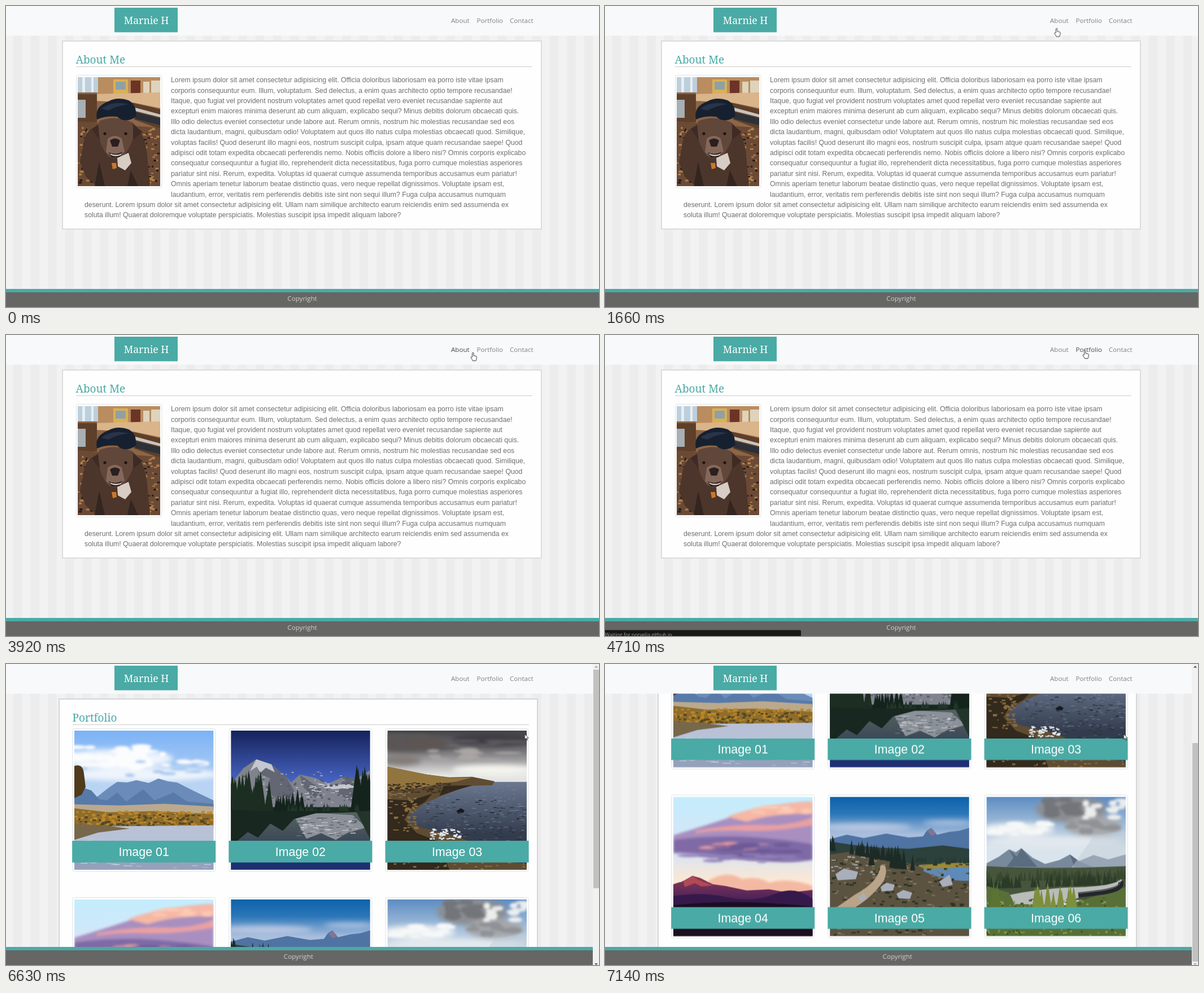
An HTML page that plays this animation: 1050 px wide and 533 px high, repeating every 8000 ms.

```html
<!DOCTYPE html>
<html lang="en">
<head>
<meta charset="utf-8">
<title>Portfolio site</title>
<style>
html, body { margin: 0; width: 100%; height: 100%; overflow: hidden; background: #f1f1f1; }
svg.stage { display: block; width: 1050px; height: 533px; }
.serif { font-family: "Noto Serif", serif; }
.ui { font: 11.6px "Open Sans", "Noto Sans", sans-serif; }
.copy { font: 12.25px "Liberation Sans", Arial, sans-serif; fill: #6f6f6f; }
.label { font: 21.4px "Liberation Sans", Arial, sans-serif; fill: #fff; text-anchor: middle; }
.teal { fill: #4aaaa5; }
.link { fill: #808182; }
.thumb { fill: #fff; stroke: #dee2e6; }

.cut { animation: 8s step-end infinite; }
#about { animation-name: about; }
#portfolio, #bar { animation-name: portfolio; }
#page { animation-name: page; }
#thumb { animation-name: thumb; }
#copyright { animation-name: copyright; }
#linkA { animation-name: linkA; }
#linkP { animation-name: linkP; }
#status { animation-name: status; }
#cache { animation-name: cache; }
#host { animation-name: host; }
#arrow { animation-name: arrow; }
#hand { animation-name: hand; }
#up { animation-name: up; }
#down { animation-name: down; }
#cursor { animation: move 8s linear infinite; }

@keyframes about { 0% { opacity: 1 } 68.95%, 100% { opacity: 0 } }
@keyframes portfolio { 0% { opacity: 0 } 68.95%, 100% { opacity: 1 } }
@keyframes copyright { 0% { transform: none } 68.95%, 100% { transform: translateX(-6.7px) } }
@keyframes page {
  0% { transform: none } 88.1% { transform: translateY(-91px) }
  89.2%, 100% { transform: translateY(-181.5px) }
}
@keyframes thumb {
  0% { transform: none } 88.1% { transform: translateY(65px) }
  89.2%, 100% { transform: translateY(129.5px) }
}
@keyframes up { 0% { fill: #a3a3a3 } 88.1%, 100% { fill: #505050 } }
@keyframes down { 0% { fill: #505050 } 89.2%, 100% { fill: #a3a3a3 } }
@keyframes linkA {
  0% { fill: #808182 } 22.4% { fill: #505152 } 37.7% { fill: #4b4b4b } 50.5%, 100% { fill: #808182 }
}
@keyframes linkP {
  0% { fill: #808182 } 51% { fill: #4b4b4b } 68.95% { fill: #808182 }
  75.5% { fill: #4b4b4b } 78.5%, 100% { fill: #808182 }
}
@keyframes status {
  0% { opacity: 0 } 23.75% { opacity: 1 }
  42.5% { opacity: .75 } 43.1% { opacity: .5 } 43.75% { opacity: .25 } 44.4% { opacity: 0 }
  53% { opacity: 1 }
  71.5% { opacity: .75 } 72.1% { opacity: .5 } 72.75% { opacity: .25 } 73.35%, 100% { opacity: 0 }
}
@keyframes cache { 0% { opacity: 0 } 32.85% { opacity: 1 } 50%, 100% { opacity: 0 } }
@keyframes host { 0% { opacity: 1 } 32.85% { opacity: 0 } 50%, 100% { opacity: 1 } }
@keyframes arrow { 0% { opacity: 0 } 2.35% { opacity: 1 } 19.5% { opacity: 0 } 77.5%, 100% { opacity: 1 } }
@keyframes hand { 0% { opacity: 0 } 19.5% { opacity: 1 } 77.5%, 100% { opacity: 0 } }
@keyframes move {
  0%, 2.35% { transform: translate(971px, 517px) }
  5.25%, 8.125% { transform: translate(915px, 349px) }
  10.625%, 12.875% { transform: translate(852px, 195px) }
  17.5% { transform: translate(813px, 70px) }
  20% { transform: translate(800px, 42px) }
  20.75%, 23.125% { transform: translate(799.7px, 39.5px) }
  24.75% { transform: translate(799.7px, 26px) }
  26.375%, 32.75% { transform: translate(799.7px, 37px) }
  32.85%, 41.875% { transform: translate(799.7px, 35px) }
  49% { transform: translate(826.8px, 31px) }
  52.5% { transform: translate(850px, 24px) }
  54.125% { transform: translate(850px, 18px) }
  55.875%, 58.125% { transform: translate(850px, 24px) }
  58.875%, 74.625% { transform: translate(850px, 27px) }
  82.85%, 100% { transform: translate(918.4px, 124px) }
}
</style>
</head>
<body>
<svg class="stage" viewBox="0 0 1050 533">
<defs>
  <pattern id="stripes" width="30.64" height="533" patternUnits="userSpaceOnUse">
    <path fill="#f2f2f2" d="M0 0h31v533H0z"/><path fill="#ececec" d="M13 0h15.3v533H13z"/>
  </pattern>
  <filter id="soft" x="-30%" y="-60%" width="160%" height="220%"><feGaussianBlur stdDeviation="5"/></filter>
  <filter id="mist" x="-20%" y="-40%" width="140%" height="180%"><feGaussianBlur stdDeviation="2"/></filter>
  <linearGradient id="sky1" x2="0" y2="1"><stop stop-color="#7cb2f6"/><stop offset=".4" stop-color="#b9d4f3"/></linearGradient>
  <linearGradient id="sky2" x2="0" y2="1"><stop stop-color="#15225a"/><stop offset=".36" stop-color="#4663c0"/></linearGradient>
  <linearGradient id="lake2" x2="0" y2="1"><stop stop-color="#56645f"/><stop offset=".5" stop-color="#3d4a58"/><stop offset=".85" stop-color="#1f2f72"/></linearGradient>
  <linearGradient id="sky3" x2="0" y2="1"><stop stop-color="#454346"/><stop offset=".15" stop-color="#77767a"/><stop offset=".32" stop-color="#e4e4e2"/></linearGradient>
  <linearGradient id="sea3" x2="0" y2="1"><stop stop-color="#6b7890"/><stop offset=".6" stop-color="#333c4d"/></linearGradient>
  <linearGradient id="sky4" x2="0" y2="1"><stop stop-color="#c4edfd"/><stop offset=".4" stop-color="#d8e4f4"/><stop offset=".6" stop-color="#fbe8d4"/></linearGradient>
  <linearGradient id="hill4" x2="0" y2="1"><stop stop-color="#8a3a58"/><stop offset=".4" stop-color="#4a2259"/><stop offset="1" stop-color="#1c0c20"/></linearGradient>
  <linearGradient id="sky5" x2="0" y2="1"><stop stop-color="#0c62a8"/><stop offset=".12" stop-color="#2b76b8"/><stop offset=".27" stop-color="#a9bedd"/></linearGradient>
  <linearGradient id="sky6" x2="0" y2="1"><stop stop-color="#5d8cc2"/><stop offset=".36" stop-color="#d9e4ec"/></linearGradient>

  <symbol id="dog" viewBox="0 0 146 193">
    <path fill="#8c6646" d="M0 0h146v193H0z"/>
    <path fill="#b98d5f" d="M34 0h112v32H34z"/>
    <path fill="#bccfdd" d="M0 0h36v27H0z"/><path fill="#e9eef0" d="M8 0h5v27H8zM24 0h4v27h-4z"/>
    <path fill="#d9b056" d="M63 4h26v27H63z"/><path fill="#8fa1a4" d="M67 8h18v14H67z"/>
    <path fill="#6b3426" d="M94 6h17v26H94z"/><path fill="#dfd3bc" d="M116 8h11v24h-11zM130 6h16v22h-16z"/>
    <path fill="#dab48a" d="M30 30 146 27v28L98 45 30 42z"/>
    <path fill="#5e3f2a" d="M95 45 146 57v35L100 75zM0 30h34v50H0z"/>
    <path fill="#a7b0b4" d="M0 40h14v32H0z"/>
    <path fill="#c9c4bd" d="M102 54 146 66v5L102 60z"/><path fill="#2c3038" d="M102 62 146 73v12L102 74z"/>
    <path fill="#6b4a35" d="M0 78 146 90v103H0z"/><g id="rug"></g>
    <path fill="#4c352b" d="M36 88Q16 88 10 118L4 150 14 176 34 193H128L124 150Q122 100 96 80z"/>
    <path fill="#61463a" d="M38 78Q66 66 96 80L102 96Q97 118 84 136 66 149 53 139 39 121 36 98z"/>
    <path fill="#3f2b25" d="M36 84 25 92 39 112zM98 84l17 13-17 14z"/>
    <path fill="#85685a" d="M53 109Q66 99 78 109L83 132Q66 146 50 133z"/>
    <path fill="#2b1f1f" d="M57 112q9-7 18 0l-4 11H61zM55 133q12 6 24-1l-5 10H60z"/>
    <path fill="#d8cdc4" d="M57 135q11 5 21 0l-2 3q-9 4-17 0zM70 143l20-9 5 18-11 13-13-7z"/>
    <circle cx="48" cy="100" r="2.6" fill="#1c1515"/><circle cx="85" cy="100" r="2.6" fill="#1c1515"/>
    <path fill="#c7792b" d="M60 152h8l1 9-7 2z"/>
    <path fill="#33251f" d="M38 150 48 193H30zM94 165l13 28H88z"/>
    <path fill="#17202f" d="M34 75Q29 52 54 43 70 34 90 41 105 49 103 70 84 83 70 70 50 68 34 75z"/>
    <path fill="#283449" d="M42 56Q60 41 90 48 72 50 54 59z"/>
  </symbol>

  <symbol id="p1" viewBox="0 0 247 247">
    <path fill="url(#sky1)" d="M0 0h247v247H0z"/>
    <g fill="#eef4fc" filter="url(#soft)"><ellipse cx="70" cy="50" rx="105" ry="17"/><ellipse cx="120" cy="78" rx="140" ry="12"/></g>
    <g id="clouds1" filter="url(#mist)"></g>
    <path fill="#6b8cb9" d="M0 126 40 118 60 102 76 91 94 92 110 88 132 93 149 85 166 90 182 92 214 108 247 124v16H0z"/>
    <path fill="#587aa9" d="M0 112 14 101 30 106 44 122 58 124 76 110 92 126 122 104 142 124 176 110 200 126 247 130v10H0z"/>
    <path fill="#bba98d" d="M0 131 80 133 160 130 247 135v12H0z"/>
    <path fill="#8e6d2d" d="M0 138 60 145 140 143 247 148v25H0z"/><g id="grove"></g>
    <path fill="#b8c1d6" d="M0 178 60 170 247 168v79H0z"/>
    <path fill="#77684c" d="M0 166 50 168 98 174 42 181 0 194z"/>
    <path fill="#95a1bb" d="M0 222Q120 205 247 226v21H0z"/><g id="ripple"></g>
    <path fill="#4f3a1c" d="M0 63Q15 58 17 76L20 100 13 114 0 120z"/>
  </symbol>

  <symbol id="p2" viewBox="0 0 247 247">
    <path fill="url(#sky2)" d="M0 0h247v247H0z"/>
    <path fill="#80838d" d="M0 95 22 67 45 51 72 60 98 82 107 92 122 78 150 84 170 95 200 82 222 86 247 70v76H0z"/>
    <path fill="#626773" d="M45 51 50 76 70 85 62 108 104 135 112 106 98 82 72 60zM122 78 128 100 150 120 160 104zM200 82 190 112 220 130 247 120V88z"/>
    <path fill="#c4c7ce" d="M45 51 34 72 46 64 52 75 62 66 78 74 72 60zM150 92 170 97 210 95 222 101 180 104z"/>
    <g id="snow"></g>
    <path fill="url(#lake2)" d="M0 142h247v105H0z"/>
    <path fill="#8c9199" d="M112 152 150 146 216 150 240 172 206 182 186 194 160 182 134 192z"/>
    <path fill="#18271f" d="M0 136H247v8L150 147 112 157 92 178 70 165 48 190 30 180 0 205z"/>
    <path fill="#23352a" d="M222 143h25v50l-12-24z"/><g id="pines"></g><g id="glints"></g>
  </symbol>

  <symbol id="p3" viewBox="0 0 247 247">
    <path fill="url(#sky3)" d="M0 0h247v247H0z"/>
    <g filter="url(#soft)"><ellipse cx="40" cy="24" rx="70" ry="14" fill="#5b5552"/><ellipse cx="190" cy="16" rx="75" ry="12" fill="#3f3e44"/><ellipse cx="25" cy="53" rx="35" ry="9" fill="#817b77"/><ellipse cx="190" cy="70" rx="75" ry="9" fill="#f5f5f0"/></g>
    <g id="clouds3" filter="url(#mist)"></g>
    <path fill="url(#sea3)" d="M0 91h247v156H0z"/><g id="waves"></g>
    <path fill="#5f4c32" d="M0 64 35 71 70 78 110 83 150 82 190 90 186 97 150 98 124 105 94 117 69 128 44 144 36 157 59 172 84 178 124 187 144 197 170 226 247 237v10H0z"/>
    <path fill="#92743f" d="M0 64 35 71 70 78 112 84 150 83 120 91 98 93 60 101 0 108z"/>
    <path fill="#33291c" d="M0 122 42 124 80 112 66 127 40 142 30 158 52 182 90 196 110 247H0zM100 98 150 97 124 105 92 116z"/>
    <g id="foam"></g><path fill="#161a20" d="M122 143l8-5 7 4-3 4h-9z"/><g id="heath"></g>
  </symbol>

  <symbol id="p4" viewBox="0 0 247 247">
    <path fill="url(#sky4)" d="M0 0h247v247H0z"/>
    <g filter="url(#mist)">
      <path fill="#a98fc0" d="M0 68Q60 50 120 30T247 8v104Q190 118 130 112T0 100z"/>
      <path fill="#f6b8a4" d="M95 35Q150 14 247 8v22Q180 28 130 44z"/>
      <path fill="#7f6aa6" d="M0 76Q80 66 150 72T247 84v28Q205 118 160 114T70 104 0 98z"/>
      <path fill="#e9a0a2" d="M40 60Q110 48 160 50T247 36v14Q180 62 130 60T40 64z"/>
    </g>
    <g id="clouds4" filter="url(#mist)"></g>
    <path fill="#f4b9a2" filter="url(#mist)" d="M60 150Q95 128 122 146 150 140 170 152 205 142 247 158v14H60z"/>
    <path fill="url(#hill4)" d="M0 155 18 149 34 140 48 144 70 155 92 158 130 166 170 164 205 170 247 165v82H0z"/>
    <path fill="#b14a55" d="M18 150 34 141 44 147 70 157 50 159 38 153 20 160z"/>
    <path fill="#35194b" d="M0 176Q50 168 96 178T180 172 247 182v65H0z"/><path fill="#1c0d21" d="M0 192Q120 180 247 195v52H0z"/>
  </symbol>

  <symbol id="p5" viewBox="0 0 247 247">
    <path fill="url(#sky5)" d="M0 0h247v247H0z"/>
    <g filter="url(#soft)" fill="#b9c7e2"><ellipse cx="60" cy="54" rx="85" ry="7"/><ellipse cx="210" cy="46" rx="45" ry="4"/></g>
    <path fill="#4f73a2" d="M0 75 30 67 60 73 100 65 140 72 165 70 172 60 180 55 190 67 212 62 230 60 247 55v65H0z"/>
    <path fill="#86748f" d="M173 61 180 56 188 66 180 69z"/>
    <path fill="#2c403c" d="M0 79 40 85 90 90 140 92 200 86 247 92v55H0z"/>
    <path fill="#5b5340" d="M0 102 60 94 110 110 170 126 247 138v109H0z"/>
    <path fill="#5d8ab9" d="M166 125Q210 117 247 125v24Q205 150 166 132z"/><path fill="#9b8935" d="M152 121 247 116v8L170 128z"/>
    <g id="scrub"></g>
    <path fill="#b9a389" d="M90 121Q88 150 45 173L6 200H38Q74 180 96 148 103 130 97 121z"/>
    <g fill="#a9aebb"><path d="M10 137 25 127 50 133 46 146 14 148zM90 160 100 152 115 156 112 166 92 168zM118 172 130 165 146 170 142 181 122 180zM194 150 212 138 218 156 200 160zM50 178 60 171 66 180 56 186z"/></g>
    <g id="firs"></g>
  </symbol>

  <symbol id="p6" viewBox="0 0 247 247">
    <path fill="url(#sky6)" d="M0 0h247v247H0z"/>
    <g filter="url(#soft)"><ellipse cx="150" cy="22" rx="62" ry="24" fill="#8b8d92"/><ellipse cx="190" cy="52" rx="50" ry="18" fill="#a6a8ab"/><ellipse cx="55" cy="58" rx="65" ry="12" fill="#eef1f3"/><ellipse cx="120" cy="80" rx="120" ry="10" fill="#e3e9ee"/></g>
    <g id="clouds6" filter="url(#mist)"></g>
    <path fill="#78899b" d="M0 118 22 106 40 93 52 98 62 91 82 108 104 119 130 112 148 102 164 114 190 103 216 111 247 102v35H0z"/>
    <path fill="#5a6c80" d="M40 93 48 108 36 124H90L62 91 54 106zM148 102 156 125h34l-26-11z"/>
    <path fill="#becbd4" opacity=".45" d="M190 70 247 60v65L150 127z"/>
    <path fill="#46553b" d="M0 123Q100 129 247 123v60H0z"/><g id="woods"></g>
    <path fill="#b9bcb9" d="M30 176Q100 161 170 160 224 158 239 146L244 154Q215 164 180 170 150 188 112 196H44z"/>
    <path fill="#587038" d="M0 158 40 170 50 190 140 192 247 160v87H0z"/>
    <path fill="none" stroke="#23262b" stroke-width="9" d="M163 174 206 169Q244 163 238 150"/>
    <path fill="none" stroke="#8d8d85" d="M163 171 206 166Q240 160 237 149"/><g id="meadow"></g><g id="spruce"></g>
  </symbol>
</defs>

<path fill="url(#stripes)" d="M0 0h1050v533H0z"/>

<g id="about" class="cut">
  <path fill="#fefefe" stroke="#dcdcdc" stroke-width="2" d="M100 62h848v333H100z"/>
  <text class="serif teal" x="123.5" y="102" font-size="19">About Me</text>
  <path fill="#ccc" d="M124 107h808v1H124z"/>
  <rect class="thumb" x="124.5" y="122.5" width="151.5" height="199.5" rx="3"/>
  <use href="#dog" x="127" y="126" width="146" height="193"/>
  <g id="copy" class="copy"></g>
</g>

<g id="portfolio" class="cut">
  <g id="page" class="cut">
    <path fill="#fefefe" stroke="#d6d6d6" stroke-width="2" d="M94 62h847v700H94z"/>
    <text class="serif teal" x="117.5" y="102" font-size="19">Portfolio</text>
    <path fill="#ccc" d="M118 107h808v1H118z"/>
    <g id="gallery"></g>
  </g>
</g>

<path fill="#f8f9fa" d="M0 0h1050v52.5H0z"/>
<path class="teal" d="M192 3h112v43.5H192z"/>
<text class="serif" x="248.5" y="32" font-size="17.6" fill="#fff" text-anchor="middle">Marnie H</text>
<g class="ui">
  <text id="linkA" class="link cut" x="788" y="30">About</text>
  <text id="linkP" class="link cut" x="833.5" y="30">Portfolio</text>
  <text class="link" x="892" y="30">Contact</text>
</g>

<path fill="#666664" d="M0 507h1050v26H0z"/><path class="teal" d="M0 501h1050v6H0z"/>
<text id="copyright" class="ui cut" x="524.5" y="521.5" fill="#d2d2d2" text-anchor="middle">Copyright</text>

<g id="bar" class="cut">
  <path fill="#f1f1f1" d="M1039 0h11v533h-11z"/>
  <path id="thumb" class="cut" fill="#c1c1c1" d="M1040 10h10v387h-10z"/>
  <path id="up" class="cut" d="M1042 6.500h6l-3-3.500z"/><path id="down" class="cut" d="M1042 530h6l-3 3z"/>
</g>

<g id="status" class="cut" font-family="Open Sans, Noto Sans, sans-serif" font-size="8.8" fill="#a2a5a2">
  <path fill="#161815" d="M0 522.5h345q2 0 2 2V533H0z"/>
  <text id="host" class="cut" y="534">Waiting for norvelia.github.io...</text>
  <text id="cache" class="cut" y="534">Waiting for cache...</text>
</g>

<g id="cursor" fill="#fff" stroke="#222" stroke-width=".9" stroke-linejoin="round">
  <path id="arrow" class="cut" d="M0 0V9.500L2.200 7.500 3.700 11 5.200 10.300 3.800 7H6.700z"/>
  <path id="hand" class="cut" d="M-1.300 8V1.300a1.200 1.200 0 0 1 2.400 0V5.500l4 .9q1.600.5 1.500 2L6 11.500 5 14.700H-.5Q-1.500 12-3.600 9.600q-.7-1.900.8-1.800z"/>
</g>
</svg>
<script>
const $ = id => document.getElementById(id);
let seed = 7;
const rnd = () => (seed = seed * 16807 % 2147483647) / 2147483647;
const between = (a, b) => a + (b - a) * rnd();
const fix = n => n.toFixed(1);

const draw = (id, fill, n, shape) => {
  const d = Array.from({ length: n }, shape).join('');
  $(id).insertAdjacentHTML('beforeend', `<path fill="${fill}" d="${d}"/>`);
};
// Small flat flecks inside a box
const flecks = (id, fill, n, x0, y0, x1, y1, w, h) => draw(id, fill, n, () => {
  const fw = fix(between(.4, 1) * w);
  return `M${fix(between(x0, x1))} ${fix(between(y0, y1))}h${fw}v${fix(between(.4, 1) * h)}h-${fw}z`;
});
// Flat ovals that join into clouds
const puffs = (id, fill, n, x0, y0, x1, y1, w, h) => draw(id, fill, n, () => {
  const rx = fix(between(.4, 1) * w), ry = fix(between(.4, 1) * h), arc = `a${rx} ${ry} 0 1 1 `;
  return `M${fix(between(x0, x1))} ${fix(between(y0, y1))}${arc}${2 * rx} 0${arc}${-2 * rx} 0z`;
});
// Narrow conifers; the base line runs from (x0, y0) to (x1, y1)
const trees = (id, fill, n, x0, y0, x1, y1, tall) => draw(id, fill, n, () => {
  const t = rnd(), x = x0 + (x1 - x0) * t, y = y0 + (y1 - y0) * t;
  const h = between(.6, 1) * tall, w = h * .12 + 1;
  return `M${fix(x - w)} ${fix(y)}L${fix(x)} ${fix(y - h)} ${fix(x + w)} ${fix(y)}z`;
});

flecks('rug', '#b5824c', 110, 0, 88, 143, 190, 6, 4);
flecks('rug', '#241d1c', 110, 0, 88, 143, 190, 6, 4);
puffs('clouds1', '#fbfcfe', 26, -15, 28, 120, 66, 22, 7);
puffs('clouds1', '#fbfcfe', 12, 100, 38, 225, 62, 16, 5);
puffs('clouds1', '#a9c8ef', 12, 0, 55, 220, 80, 16, 3);
flecks('grove', '#bd8726', 120, 0, 142, 244, 166, 7, 5);
flecks('grove', '#554720', 90, 0, 148, 244, 168, 7, 4);
flecks('ripple', '#c5cddd', 60, 0, 190, 240, 244, 16, 1.2);
flecks('snow', '#dfe2e7', 32, 115, 94, 225, 118, 8, 1.5);
flecks('snow', '#565b66', 60, 20, 78, 225, 130, 6, 4);
flecks('snow', '#a5a8b0', 60, 20, 70, 225, 130, 5, 3);
trees('pines', '#14231c', 30, 0, 142, 130, 143, 40);
trees('pines', '#1c2e22', 20, 0, 141, 70, 143, 72);
trees('pines', '#14231c', 12, 222, 143, 246, 140, 90);
trees('pines', '#223529', 30, 100, 143, 230, 143, 15);
flecks('glints', '#c7c9cc', 45, 120, 154, 222, 184, 12, 1.5);
flecks('glints', '#59636a', 40, 115, 154, 222, 188, 10, 2);
puffs('clouds3', '#a9a5a2', 12, 20, 34, 200, 52, 26, 4);
puffs('clouds3', '#5a575a', 10, -10, 8, 210, 34, 28, 4);
flecks('waves', '#77839a', 170, 60, 96, 244, 215, 8, 1);
flecks('waves', '#252c3a', 130, 60, 120, 244, 220, 8, 1.5);
flecks('foam', '#e6eaee', 60, 74, 174, 128, 192, 6, 3);
flecks('heath', '#8a7145', 70, 0, 202, 244, 245, 6, 3);
flecks('heath', '#8a6f42', 70, 0, 100, 50, 180, 7, 3);
flecks('heath', '#3a2f1f', 90, 0, 92, 110, 110, 7, 2.5);
puffs('clouds4', '#e99d9f', 9, 40, 78, 150, 92, 24, 2.5);
puffs('clouds4', '#6d5a98', 14, 60, 84, 220, 108, 26, 4);
puffs('clouds4', '#8f7fb6', 14, -10, 102, 210, 116, 22, 4);
puffs('clouds4', '#fbcbb6', 10, 130, 16, 230, 28, 18, 3);
flecks('scrub', '#2e3324', 140, 0, 108, 244, 244, 9, 4);
flecks('scrub', '#85775a', 110, 0, 112, 244, 244, 8, 3);
flecks('scrub', '#a0a2a8', 30, 0, 105, 90, 140, 8, 3);
trees('firs', '#1d2b27', 26, 0, 95, 150, 122, 30);
trees('firs', '#1d2b27', 7, 60, 120, 160, 132, 45);
trees('firs', '#263b35', 22, 160, 116, 246, 118, 14);
puffs('clouds6', '#f7f8f8', 14, -10, 44, 90, 66, 20, 5);
puffs('clouds6', '#727579', 12, 90, 4, 170, 32, 18, 8);
puffs('clouds6', '#eceded', 14, 165, 2, 235, 44, 14, 6);
puffs('clouds6', '#8f9296', 10, 130, 44, 220, 62, 16, 6);
trees('woods', '#38482f', 75, 0, 150, 246, 146, 22);
trees('woods', '#2b3b28', 70, 0, 163, 230, 156, 24);
flecks('meadow', '#8a963f', 110, 0, 180, 244, 244, 5, 4);
flecks('meadow', '#3d5228', 90, 0, 178, 244, 244, 6, 4);
trees('spruce', '#7d8f3c', 14, 80, 195, 160, 198, 48);
trees('spruce', '#5b7333', 6, 8, 198, 36, 198, 48);

const lines = `Lorem ipsum dolor sit amet consectetur adipisicing elit. Officia doloribus laboriosam ea porro iste vitae ipsam
corporis consequuntur eum. Illum, voluptatum. Sed delectus, a enim quas architecto optio tempore recusandae!
Itaque, quo fugiat vel provident nostrum voluptates amet quod repellat vero eveniet recusandae sapiente aut
excepturi enim maiores minima deserunt ab cum aliquam, explicabo sequi? Minus debitis dolorum obcaecati quis.
Illo odio delectus eveniet consectetur unde labore aut. Rerum omnis, nostrum hic molestias recusandae sed eos
dicta laudantium, magni, quibusdam odio! Voluptatem aut quos illo natus culpa molestias obcaecati quod. Similique,
voluptas facilis! Quod deserunt illo magni eos, nostrum suscipit culpa, ipsam atque quam recusandae saepe! Quod
adipisci odit totam expedita obcaecati perferendis nemo. Nobis officiis dolore a libero nisi? Omnis corporis explicabo
consequatur consequuntur a fugiat illo, reprehenderit dicta necessitatibus, fuga porro cumque molestias asperiores
pariatur sint nisi. Rerum, expedita. Voluptas id quaerat cumque assumenda temporibus accusamus eum pariatur!
Omnis aperiam tenetur laborum beatae distinctio quas, vero neque repellat dignissimos. Voluptate ipsam est,
laudantium, error, veritatis rem perferendis debitis iste sint non sequi illum? Fuga culpa accusamus numquam
deserunt. Lorem ipsum dolor sit amet consectetur adipisicing elit. Ullam nam similique architecto earum reiciendis enim sed assumenda ex
soluta illum! Quaerat doloremque voluptate perspiciatis. Molestias suscipit ipsa impedit aliquam labore?`.split('\n');
$('copy').innerHTML = lines.map((line, i) =>
  `<text x="${i < 12 ? 292 : 139}" y="${fix(135.3 + 18.38 * i)}">${line}</text>`).join('');

$('gallery').innerHTML = Array.from({ length: 6 }, (_, i) => {
  const x = 117.2 + 277.2 * (i % 3), y = 114 + 299 * Math.floor(i / 3);
  return `<g transform="translate(${fix(x)} ${y})">
    <rect class="thumb" x=".5" y=".5" width="253" height="253" rx="3"/>
    <use href="#p${i + 1}" x="3.8" y="3.8" width="246.6" height="246.6"/>
    <rect class="teal" y="199" width="254" height="38.5"/>
    <text class="label" x="127" y="225.5">Image 0${i + 1}</text></g>`;
}).join('');
</script>
</body>
</html>
```
